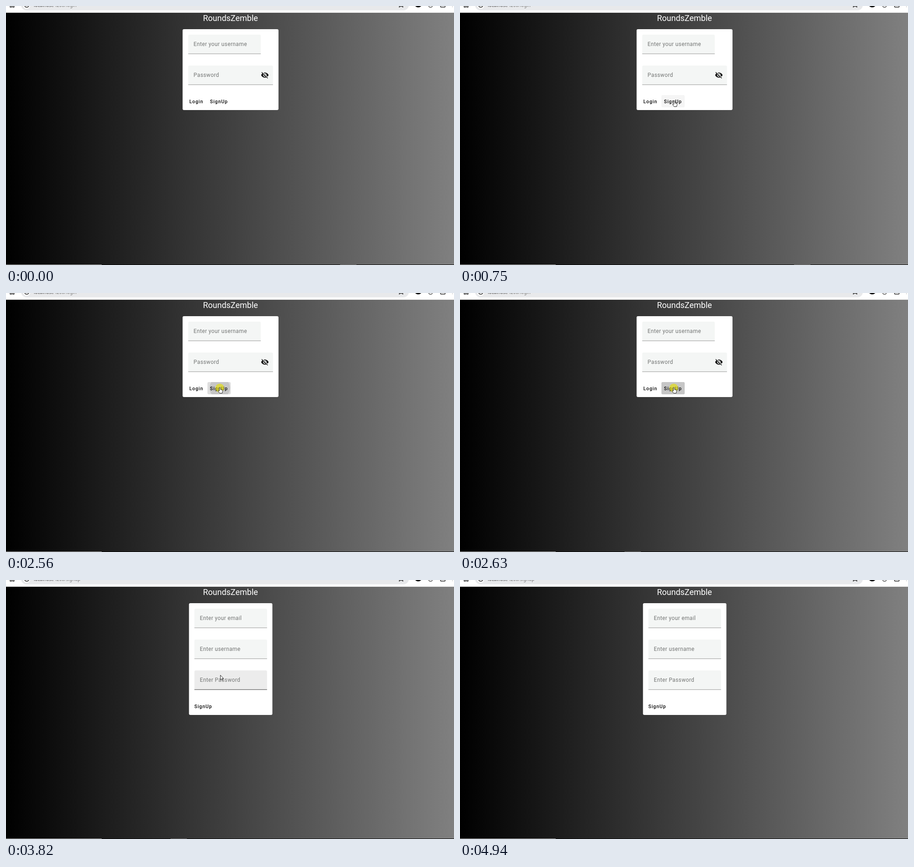
These frames come from a looping animation (983 by 570 pixels, 5080 ms). An HTML page:

```html
<!DOCTYPE html>
<html lang="en">
<head>
<meta charset="utf-8">
<title>Login and sign-up</title>
<style>
  html, body { margin: 0; width: 100%; height: 100%; overflow: hidden; background: #000; }
  svg { display: block; width: 983px; height: 570px; }
  text { font-family: Roboto, sans-serif; white-space: pre; }
  .title { font-size: 18px; fill: #fff; text-anchor: middle; }
  .label { font-size: 12px; letter-spacing: .375px; fill: #737574; }
  .button { font-size: 10.5px; font-weight: 500; letter-spacing: .94px; fill: #080808; }
  .url { font: 9.9px "Noto Sans", sans-serif; fill: #777; }
  .host { fill: #444; }
  .card { fill: #fff; }
  .box { fill: #f4f6f5; }
  .line { fill: #949695; }
  .hover .box { fill: #ececec; }
  .hover .line { fill: #3c3c3c; }
  .pointer { fill: #fff; stroke: #111; stroke-width: .9; stroke-linejoin: round; }
</style>
</head>
<body>
<svg viewBox="0 0 983 570">
  <defs>
    <linearGradient id="shade"><stop stop-color="#000"/><stop offset="1" stop-color="#808080"/></linearGradient>
    <clipPath id="buttonClip"><rect x="442" y="196" width="51" height="27" rx="3"/></clipPath>
  </defs>

  <rect y="14" width="983" height="556" fill="url(#shade)"/>

  <g id="browserBar">
    <rect width="983" height="14.8" fill="#fff"/>
    <rect x="33" y="-14" width="851" height="23.5" rx="11.7" fill="#e8e9eb"/>
    <circle cx="45.5" cy="-2" r="8" fill="#fff"/>
    <g fill="none" stroke="#2a2a2a" stroke-width="1.5">
      <path d="M9.2-2h3v4.4h-3zM14.7-2h3v4.4h-3z"/>
      <circle cx="45.5" cy="-2" r="4.8"/>
      <path d="M863.5-2l-.6 4.4 4-2.2 4 2.2-.6-4.4" stroke-width="1.2"/>
      <circle cx="931.5" cy="-1.5" r="4.4" stroke="#666"/>
      <rect x="953.5" y="-8" width="10" height="10.4" rx="1"/>
    </g>
    <ellipse cx="904.5" cy="-1" rx="6.5" ry="4" fill="#111"/>
    <path d="M979.5 0v3" stroke="#ccc"/>
    <text class="url" x="61" y="1.6"><tspan class="host">localhost</tspan>:4200/<tspan id="route">login</tspan></text>
  </g>

  <g id="taskbar">
    <rect y="569" width="983" height="1" fill="#080808"/>
    <rect y="569" width="210" height="1" fill="#a8a8a8"/>
    <rect id="task" y="569" width="36" height="1" fill="#6a6a6a"/>
  </g>

  <text class="title" x="492.5" y="33.3">RoundsZemble</text>

  <g id="login">
    <rect class="card" x="387.5" y="51" width="210.4" height="178" rx="3"/>
    <g id="loginFields"></g>
    <g transform="translate(559 143) scale(.75)">
      <path fill="#161616" d="M12 7c2.76 0 5 2.24 5 5 0 .65-.13 1.26-.36 1.83l2.92 2.92c1.51-1.26 2.7-2.89 3.43-4.75-1.73-4.39-6-7.5-11-7.5-1.4 0-2.74.25-3.98.7l2.16 2.16C10.74 7.13 11.35 7 12 7zM2 4.27l2.74 2.74C3.08 8.3 1.78 10.02 1 12c1.73 4.39 6 7.5 11 7.5 1.55 0 3.03-.3 4.38-.84L19.73 22 21 20.73 3.27 3zM7.53 9.8l1.55 1.55c-.05.21-.08.43-.08.65 0 1.66 1.34 3 3 3 .22 0 .44-.03.65-.08l1.55 1.55c-.67.33-1.41.53-2.2.53-2.76 0-5-2.24-5-5 0-.79.2-1.53.53-2.2zm4.31-.78l3.15 3.15.02-.16c0-1.66-1.34-3-3-3z"/>
    </g>
    <rect id="buttonBack" x="442" y="196" width="51" height="27" rx="3"/>
    <circle id="ripple" cx="469" cy="209" fill="#c6c6c6" clip-path="url(#buttonClip)"/>
    <text class="button" x="402.2" y="213.6">Login</text>
    <text class="button" x="447.6" y="213.6">SignUp</text>
  </g>

  <g id="signup">
    <rect class="card" x="401.5" y="51" width="183" height="246" rx="3"/>
    <g id="signupFields"></g>
    <text class="button" x="413.2" y="281.6">SignUp</text>
  </g>

  <circle id="click" cx="469" cy="209" r="9.6" fill="#e6e000" opacity=".62"/>
  <g id="cursor" class="pointer">
    <path id="arrow" d="M.4.4V10.6L2.7 8.5 4.2 12 5.8 11.3 4.3 7.8H7.4Z"/>
    <path id="hand" d="M-.8.8Q.5-.5 1.7.8V5L5.3 5.8Q6.7 6.3 6.4 8.3L5.3 13H-.1L-3.5 8.6Q-3.9 7-2.2 7.2L-.8 8.3Z"/>
  </g>
</svg>
<script>
const LOOP = 5080;
const CLICK = 2490, SIGNUP = 2700;
const $ = id => document.getElementById(id);

const field = (x, y, width, label) => `<g>
  <path class="box" d="M${x} ${y + 42}v-39q0-3 3-3h${width - 6}q3 0 3 3v39z"/>
  <rect class="line" x="${x}" y="${y + 41.7}" width="${width}" height="1"/>
  <text class="label" x="${x + 11.8}" y="${y + 25.3}">${label}</text></g>`;

$('loginFields').innerHTML =
  field(399.8, 63, 159.2, 'Enter your username') + field(399.8, 131, 186, 'Password');
$('signupFields').innerHTML =
  ['Enter your email', 'Enter username', 'Enter Password']
    .map((label, i) => field(413.4, 63 + 68 * i, 159.4, label)).join('');
const lastField = $('signupFields').lastElementChild;

// Cursor path: time, x, y
const path = [
  [70, 814, 504], [140, 702, 434], [210, 570, 350], [270, 460, 278],
  [340, 386, 236], [410, 348, 214], [470, 384, 206], [540, 437, 215],
  [610, 452, 215], [680, 463, 211], [750, 470, 208.5], [CLICK, 469, 207.5],
  [3820, 470, 209], [3890, 490, 222], [3960, 545, 258], [4030, 630, 315],
  [4100, 720, 373], [4170, 805, 428], [4240, 870, 470], [4310, 909, 492],
  [4380, 917, 515], [4450, 930, 550], [4520, 990, 580]
];

const show = (el, on) => el.setAttribute('visibility', on ? 'inherit' : 'hidden');
const inside = (x, y, left, top, right, bottom) =>
  x >= left && x <= right && y >= top && y <= bottom;

function draw(t) {
  const joined = t >= SIGNUP;
  const pressed = t >= CLICK && !joined;
  const [, x, y] = path.findLast(p => p[0] <= t) || [0, -50, -50];

  show($('login'), !joined);
  show($('signup'), joined);
  $('route').textContent = joined ? 'signup' : 'login';

  const overButton = !joined && inside(x, y, 442, 196, 493, 223);
  const overLogin = !joined && inside(x, y, 396, 196, 436, 223);
  $('buttonBack').setAttribute('fill', pressed ? '#dedede' : overButton ? '#f5f5f5' : '#fff');
  const step = Math.floor((t - CLICK) / 70);
  $('ripple').setAttribute('r', pressed ? 13.5 + 9 * step * step : 0);
  show($('click'), pressed);
  lastField.setAttribute('class', joined && inside(x, y, 413, 199, 573, 241) ? 'hover' : '');

  $('cursor').setAttribute('transform', `translate(${x} ${y})`);
  show($('hand'), overButton || overLogin);
  show($('arrow'), !overButton && !overLogin);

  $('task').setAttribute('x', t < CLICK ? 733 : 361);
  show($('task'), t < CLICK || (t >= 2630 && t < 4940));
}

const start = performance.now();
function tick() {
  draw((performance.now() - start) % LOOP);
  requestAnimationFrame(tick);
}
tick();
</script>
</body>
</html>
```
